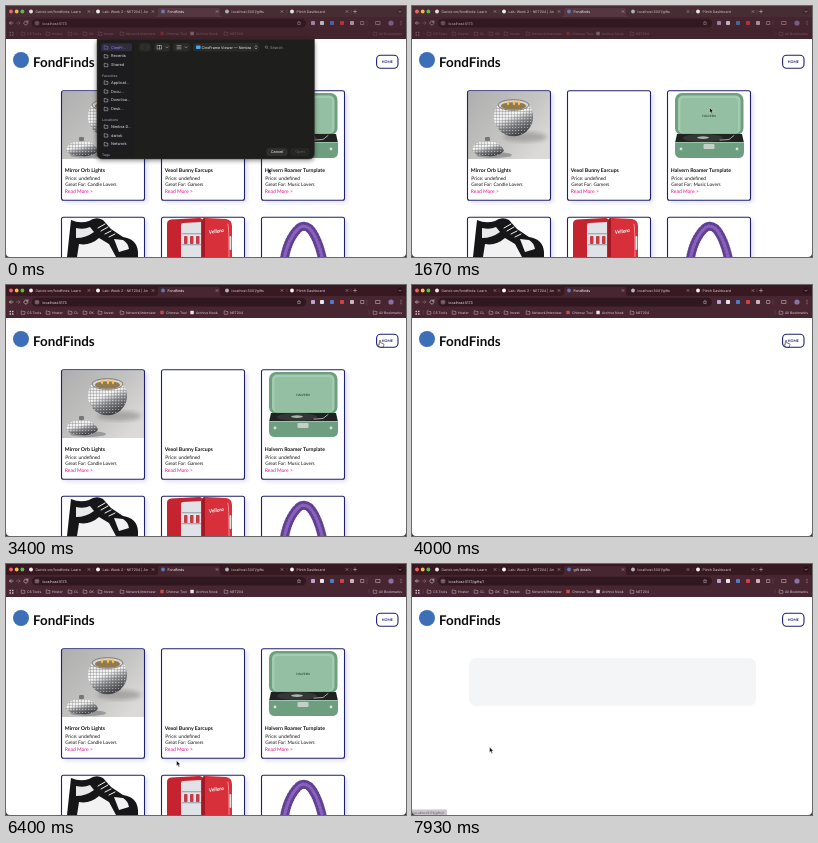
An HTML page that plays this animation: 400 by 251 pixels, repeating every 8000 ms.

```html
<!DOCTYPE html>
<html lang="en">
<head>
<meta charset="utf-8">
<title>FondFinds</title>
<style>
html, body { margin: 0; width: 100%; height: 100%; overflow: hidden; background: #fff; }
svg { display: block; width: 100vw; height: 100vh; }
text { font-family: Lato, Inter, sans-serif; text-rendering: geometricPrecision; white-space: pre; }
.ui text { font-family: Inter, Roboto, sans-serif; }
</style>
</head>
<body>
<svg id="stage" viewBox="0 0 400 251" preserveAspectRatio="none"></svg>
<script>
const LOOP = 8000;
const NAVY = '#20206e', STRIP = '#381922', BAR = '#482631';
const T = { fade: 70, focus: 3300, reload: 3750, loaded: 4670, hover: 7000, details: 7750 };

const text = (x, y, s, size, fill = '#111', weight = 400, extra = '') =>
  `<text x="${x}" y="${y}" font-size="${size}" fill="${fill}" font-weight="${weight}" ${extra}>${s}</text>`;
const rect = (x, y, w, h, fill, r = 0, extra = '') =>
  `<rect x="${x}" y="${y}" width="${w}" height="${h}" rx="${r}" fill="${fill}" ${extra}/>`;
const dot = (x, y, r, fill) => `<circle cx="${x}" cy="${y}" r="${r}" fill="${fill}"/>`;
const oval = (x, y, rx, ry, fill, extra = '') =>
  `<ellipse cx="${x}" cy="${y}" rx="${rx}" ry="${ry}" fill="${fill}" ${extra}/>`;
const path = (d, fill = 'none', extra = '') => `<path d="${d}" fill="${fill}" ${extra}/>`;
const line = (d, color, w = .6, extra = '') =>
  path(d, 'none', `stroke="${color}" stroke-width="${w}" stroke-linecap="round" stroke-linejoin="round" ${extra}`);
const group = (id, body, extra = '') => `<g id="${id}" ${extra}>${body}</g>`;

const defs = `<defs>
  <linearGradient id="photo" x2="1" y2=".7"><stop stop-color="#aeaeae"/><stop offset=".6" stop-color="#c4c4c3"/><stop offset="1" stop-color="#dbdad8"/></linearGradient>
  <linearGradient id="ball" x2=".5" y2="1"><stop stop-color="#dcdcdc"/><stop offset=".45" stop-color="#f4f4f4"/><stop offset=".7" stop-color="#8d8e91"/><stop offset="1" stop-color="#3c3d41"/></linearGradient>
  <pattern id="tiles" width="3" height="3" patternUnits="userSpaceOnUse"><path d="M0 0H3M0 0V3" stroke="#55565a" stroke-width=".7"/><path d="M1 1h1.2v1H1z" fill="#fff" opacity=".6"/></pattern>
  <filter id="soft" x="-20%" y="-20%" width="140%" height="140%"><feGaussianBlur stdDeviation="2"/></filter>
  <clipPath id="page"><rect y="33" width="400" height="218"/></clipPath>
</defs>`;

// ---------- browser chrome ----------
const folder = (x, y, color = '#c9b6bc') =>
  line(`M${x - 1.8} ${y + 1.5}v-3h1.4l.5.6h1.8v2.4z`, color, .5);
const cross = (x, y) => line(`M${x - 1} ${y - 1}l2 2m0-2l-2 2`, '#c8b5bb', .45);

function tabs() {
  const items = [
    [25, 'Dariok.vm/fondfinds: Learn', '#eee', 83],
    [92, 'Lab: Week 2 - NET204 | An', '#fff', 147],
    [221, 'localhost:3001/gifts', '#aeb4c0', 276],
    [286, 'Plinth Dashboard', '#f3f3f3', 341]
  ];
  return items.map(([x, s, color, close]) =>
    dot(x, 5.5, 1.9, color) + text(x + 4.6, 6.8, s, 3.5, '#d9c9ce') + cross(close, 5.5)).join('') +
    path('M149 11Q152 11 152 8V4Q152 2 154 2H212Q214 2 214 4V8Q214 11 217 11Z', BAR) +
    dot(157, 5.5, 1.9, '#5b78b8') +
    text(161.6, 6.8, '', 3.5, '#fff', 400, 'id="tabName"') + cross(211, 5.5) +
    line('M87 4v3M281 4v3M345 4v3', '#79545f', .4) + dot(394, 5.5, 3, '#2a1119') +
    line('M347.5 5.5h3M349 4v3M392.7 5l1.3 1.3l1.3-1.3', '#dccbd0', .5);
}

function toolbar() {
  const icons = [[307, '#b9a4d0'], [316, '#e7e7ea'], [326, '#4d7cc6'], [336, '#d4403f'], [346, '#c9b5bb']];
  return line('M7 17H3.5m1.5-1.5L3.5 17L5 18.5', '#e0d2d6') +
    line('M10.5 17H14m-1.5-1.5L14 17l-1.5 1.5', '#8e6d77') +
    line('M21.7 16a2 2 0 1 0 .2 1.6M21.9 14.8v1.4h-1.4', '#e0d2d6') +
    rect(26, 12.8, 274, 8.6, '#301720', 4.3) + dot(31, 17.1, 2.7, '#5a3a44') +
    line('M29.7 16.3h2.6M29.7 18h2.6', '#ddd', .4) +
    text(36.5, 18.5, '', 3.6, '#eee4e7', 400, 'id="address"') +
    line('M293 15.4l.6 1.2 1.3.1-1 .9.3 1.3-1.2-.7-1.2.7.3-1.3-1-.9 1.3-.1z', '#d6c5cb', .4) +
    icons.map(([x, c]) => rect(x - 2, 15, 4, 4, c, .8)).join('') +
    line('M361 14.5v5', '#79545f', .4) +
    line('M355 15.5h2.8v3H355z M370 15.5h4v3h-4z', '#dccbd0', .5) +
    dot(385, 17, 2.6, '#8b72a4') + [15.3, 17, 18.7].map(y => dot(395, y, .45, '#e0d2d6')).join('');
}

function bookmarks() {
  const items = [[17, 'CS Tools'], [42, 'Hoster'], [64, 'CL'], [79, 'GK'], [94, 'Invest'],
    [116, 'Network/Interview'], [156, 'Chinese Tool', '#c74a4a'], [186, 'Archive Nook', '#e4e4e4'],
    [220, 'NET204'], [369, 'All Bookmarks']];
  return [3.5, 6].map(x => [25.7, 28.2].map(y => rect(x, y, 1.5, 1.5, '#d6c5cb', .3)).join('')).join('') +
    line('M11 25.5v4M363 25.5v4', '#79545f', .4) +
    items.map(([x, s, color]) =>
      (color ? rect(x - 1.7, 25.7, 3.5, 3.5, color, .4) : folder(x, 27.4)) +
      text(x + 4, 28.7, s, 3.4, '#ddccd1')).join('');
}

// An unfocused window greys the tab strip and dims the bookmarks.
const inactive = group('inactive',
  rect(0, 0, 400, 11, '#a29a9d', 0, 'opacity=".15"') + rect(0, 22, 400, 11, '#41222c', 0, 'opacity=".68"') +
  rect(0, 11, 400, 11, '#3a1c25', 0, 'opacity=".25"'));

const chrome = group('chrome',
  rect(0, 0, 400, 12, STRIP) + rect(0, 11, 400, 22, BAR) +
  dot(5, 5.5, 1.9, '#f4605a') + dot(10.7, 5.5, 1.9, '#f5bd3d') + dot(16.4, 5.5, 1.9, '#4fc14c') +
  tabs() + toolbar() + bookmarks() + inactive, 'class="ui"');

// ---------- page ----------
const header = dot(15, 54, 8, '#3d6fb8') + text(27, 61.3, 'FondFinds', 13.4, '#0c0c0c', 700) +
  rect(370.6, 49.2, 21.4, 13, '#fff', 4, `stroke="${NAVY}" stroke-width="1.1"`) +
  text(381.3, 57, 'HOME', 3.6, NAVY, 700, 'text-anchor="middle"');

const tiled = d => path(d, 'url(#ball)') + path(d, 'url(#tiles)', 'opacity=".75"');

const lantern = rect(56, 85.5, 82, 67.5, 'url(#photo)') +
  oval(113, 131, 22, 5, '#8b8987', 'opacity=".6" filter="url(#soft)"') +
  oval(82, 149, 18, 3, '#77757a', 'opacity=".6"') +
  tiled('M86 99a19.5 19.5 0 1 0 31 0Z') +
  oval(101.5, 99, 15.5, 5.3, '#d9d6d0', 'stroke="#6b6863" stroke-width=".8"') +
  oval(101.5, 100, 12.5, 3.8, '#8f7a52') +
  [96, 102, 107].map(x => path(`M${x} 94q2.4 3.8 0 5.5q-2.4-1.7 0-5.5z`, '#ffc04a')).join('') +
  tiled('M60 145q1-10 15-10q14 0 17 10q-6 6-16 5q-11 0-16-5Z') +
  rect(73, 131, 5, 4, '#77777a', 1);

const turntable =
  rect(263, 87, 68.5, 42, '#6f9f80', 7) + rect(266, 89.5, 62.5, 38, '#a3cbb0', 5) +
  rect(268.5, 92, 57.5, 35, '#94bfa2', 4) +
  text(297, 110.5, 'HALVERN', 3, '#31523e', 700, 'text-anchor="middle"') +
  path('M265 128h65l2 9h-69z', '#1f2221') +
  oval(291, 132, 20, 4, '#343736') + oval(291, 131.6, 6, 1.3, '#a9b8ae') +
  line('M322 129.5l-5 4l-9 .6', '#c4cbc6', .8) +
  path('M263 136h69v10q0 6-6 6h-57q-6 0-6-6z', '#6d9e80') +
  rect(263, 136, 69, 1, '#9cc4aa') + rect(291.5, 138, 11, 5, '#c7cfc9', 1) +
  dot(269, 143, 1.4, '#d7ddd8') + dot(325, 143, 1.4, '#d7ddd8');

const shoe =
  path('M61 251L65 214Q74 218 83 215Q90 210 97 214L105 223L117 231Q131 233 132 246V251Z', '#161618') +
  path('M71 251L73 238Q84 240 93 232L103 238L110 251Z', '#f2f2f2') +
  path('M108 233L117 234Q122 237 123 243L113 246Z', '#f2f2f2') +
  path('M70 222q8 2 14-1l4 5q-8 6-18 6z', '#e9e9ea') +
  line('M92 222l7-4M95 225l7-4M99 228l6-3M103 231l6-3', '#f4f4f4', 1);

const fridge =
  path('M161 218q0-4 4-4.5l28-1.5q4 0 4 4v35h-36z', '#c4232f') +
  path('M175 219q0-2 2-2l18-1v35h-20z', '#dfe2e6') +
  [227, 238].map(y => rect(176, y, 19, 1.3, '#a7abb1')).join('') +
  [178, 184, 190].map(x => rect(x, 230, 3.5, 8, '#c63c45', .8)).join('') +
  path('M196 216q0-4 4-4l20 1q6 1 6 7v31h-30z', '#d8303b') + path('M196 216q0-4 3-4v39h-3z', '#a31824') +
  line('M222 218q1 2 1 33', '#f08b90', 1) +
  text(203, 228, 'Vellora', 5.2, '#fff', 700, 'font-style="italic" transform="rotate(-8 203 228)"') +
  rect(223.5, 230, 1.8, 14, '#e4e4e6', .9);

const strap = 'M278 255Q281 235 291 224Q297 217 304 223Q312 232 317 255';
const bag = line(strap, '#6a489f', 7.5) + line(strap, '#5f4093', 9, 'stroke-dasharray=".4 2.6"') +
  line(strap, '#8960bb', 3.5, 'stroke-dasharray=".6 2.8"');

function card(x, y, art, name, fans) {
  const info = name ? text(x + 3.3, y + 81, name, 5.2, '#111', 700) +
    text(x + 3.8, y + 88.8, 'Price: undefined', 4.9) +
    text(x + 3.8, y + 95.6, 'Great For: ' + fans, 4.75) +
    text(x + 3.3, y + 102.2, 'Read More &gt;', 5, '#e3127f') : '';
  return rect(x + 2, y + 2, 84, 110, '#d9d6f8', 3, 'filter="url(#soft)" opacity=".8"') +
    rect(x, y, 83, 109.5, '#fff', 2) + art + info +
    rect(x, y, 83, 109.5, 'none', 2, `stroke="${NAVY}" stroke-width="1.1"`);
}

const cards = group('cards',
  card(55.5, 84.8, lantern, 'Mirror Orb Lights', 'Candle Lovers') +
  card(155.5, 84.8, '', 'Vexol Bunny Earcups', 'Gamers') +
  card(255.5, 84.8, turntable, 'Halvern Roamer Turnplate', 'Music Lovers') +
  card(55.5, 211.3, shoe) + card(155.5, 211.3, fridge) + card(255.5, 211.3, bag), 'clip-path="url(#page)"');

const details = group('details', rect(57, 94, 287, 48, '#f4f5f7', 7));
const status = group('status', rect(-2, 245.5, 37, 7, '#c9c5c9', 1) +
  text(1.5, 249.7, 'localhost:5173/gifts/1', 3.1, '#57535a'), 'class="ui"');

// ---------- file sheet ----------
function fileSheet() {
  const rows = ['CineFr...', 'Recents', 'Shared', '', 'Applicat...', 'Docu...', 'Downloa...', 'Desk...', '',
    'Nimbra D...', 'dariok', 'Network'];
  const heads = [[70.5, 'Favorites'], [115, 'Locations'], [150.3, 'Tags']];
  const row = (s, i) => {
    const y = 42.6 + i * 8.8;
    return s && folder(100, y - 1.4, i ? '#d4d2d6' : '#8b7bf0') + text(105, y, s, 3.9, i ? '#e6e4e8' : '#9b8cff');
  };
  return rect(90, 33, 219, 122, '#000', 6, 'filter="url(#soft)" opacity=".4"') +
    path('M91 33H308.5V147q0 6-6 6H97q-6 0-6-6z', '#1e1f1c', 'stroke="#444" stroke-width=".4"') +
    rect(93.5, 35.5, 34, 115.5, '#1c1b1e', 4) + rect(95, 37.2, 31, 8, '#302c3a', 2) +
    rows.map(row).join('') +
    heads.map(([y, s]) => text(96, y, s, 3.4, '#858188', 700)).join('') +
    [[133, 12], [148, 16], [167, 17], [187, 66]].map(([x, w]) => rect(x, 37, w, 8.4, '#2a2b29', 3)).join('') +
    line('M137 39.7l-1.4 1.5l1.4 1.5M141 39.7l1.4 1.5l-1.4 1.5', '#4c4c4c') +
    line('M151.5 39.5h4v3.5h-4zM153.5 39.5v3.5M160 40.8l1 1l1-1', '#d1d1d1', .5) +
    line('M171 39.6h4M171 41.2h4M171 42.8h4M179 40.8l1 1l1-1', '#d1d1d1', .5) +
    rect(190, 39.4, 4.5, 3.7, '#4ba6ee', .8) + text(195.5, 42.6, 'CineFrame Viewer — Nimbra', 3.65, '#eee') +
    line('M249 40.6l1-1l1 1M249 42l1 1l1-1', '#ddd', .5) +
    line('M261.5 41a1.2 1.2 0 1 0-2.4 0a1.2 1.2 0 1 0 2.4 0M261.2 41.9l1 1', '#999', .45) +
    text(264, 42.6, 'Search', 3.9, '#949494') +
    rect(260.5, 142, 21, 8, '#30312e', 3) + rect(284.5, 142, 19, 8, '#262724', 3) +
    text(271, 147.4, 'Cancel', 3.8, '#f0f0f0', 400, 'text-anchor="middle"') +
    text(294, 147.4, 'Open', 3.8, '#5f605f', 400, 'text-anchor="middle"');
}

const corners = path('M0 251v-4q0 4 4 4zM400 251v-4q0 4-4 4z', '#35313a');
const arrow = path('M0 0V5.6L1.3 4.4L2.2 6.4L3.2 6L2.3 4H4z', '#111', 'stroke="#fff" stroke-width=".45"');
const hand = path('M-.6.2q.7-.7 1.3 0v2.2l2.6.7q.7.3.6 1.1l-.6 2.4h-3.3l-2-2.4q0-1 1.4-.3z', '#fff', 'stroke="#111" stroke-width=".55"');

const stage = document.getElementById('stage');
stage.innerHTML = defs + rect(0, 0, 400, 251, '#fff') + header + cards + details + chrome + status + corners +
  group('sheet', fileSheet(), 'class="ui"') +
  group('cursor', group('arrow', arrow) + group('hand', hand));

// ---------- motion ----------
const $ = id => document.getElementById(id);
const show = (id, on) => $(id).setAttribute('visibility', on ? 'visible' : 'hidden');
const route = [[0, 262, 162], [800, 273.5, 146.5], [1000, 273.5, 146.5], [2400, 324.8, 50.5], [2600, 324.8, 50.5],
  [3300, 374, 55.5], [5200, 374, 55.5], [6350, 170.5, 196.5], [6450, 170.5, 196.5], [7050, 77.5, 183], [LOOP + 1, 77.5, 183]];

function pointAt(t) {
  const i = route.findIndex(p => p[0] > t);
  const [t0, x0, y0] = route[i - 1], [t1, x1, y1] = route[i];
  const k = (t - t0) / (t1 - t0), e = k * k * (3 - 2 * k);
  return [x0 + (x1 - x0) * e, y0 + (y1 - y0) * e];
}

function draw(t) {
  const onDetails = t >= T.details;
  const [x, y] = pointAt(t);
  const overHome = x > 370 && y < 62;
  const overLink = t >= T.hover && !onDetails;

  $('sheet').setAttribute('opacity', Math.exp(-Math.max(0, t - T.fade) / 240));
  show('sheet', t < 1500);
  show('inactive', t < T.focus);
  show('cards', t < T.reload || (t >= T.loaded && !onDetails));
  show('details', onDetails);
  show('status', t >= T.hover);
  $('tabName').textContent = onDetails ? 'gift details' : 'Fondfinds';
  $('address').textContent = 'localhost:5173' + (onDetails ? '/gifts/1' : '');
  $('cursor').setAttribute('transform', `translate(${x} ${y})`);
  show('hand', overHome || overLink);
  show('arrow', !overHome && !overLink);
}

function tick() {
  draw(performance.now() % LOOP);
  requestAnimationFrame(tick);
}
tick();
</script>
</body>
</html>
```
